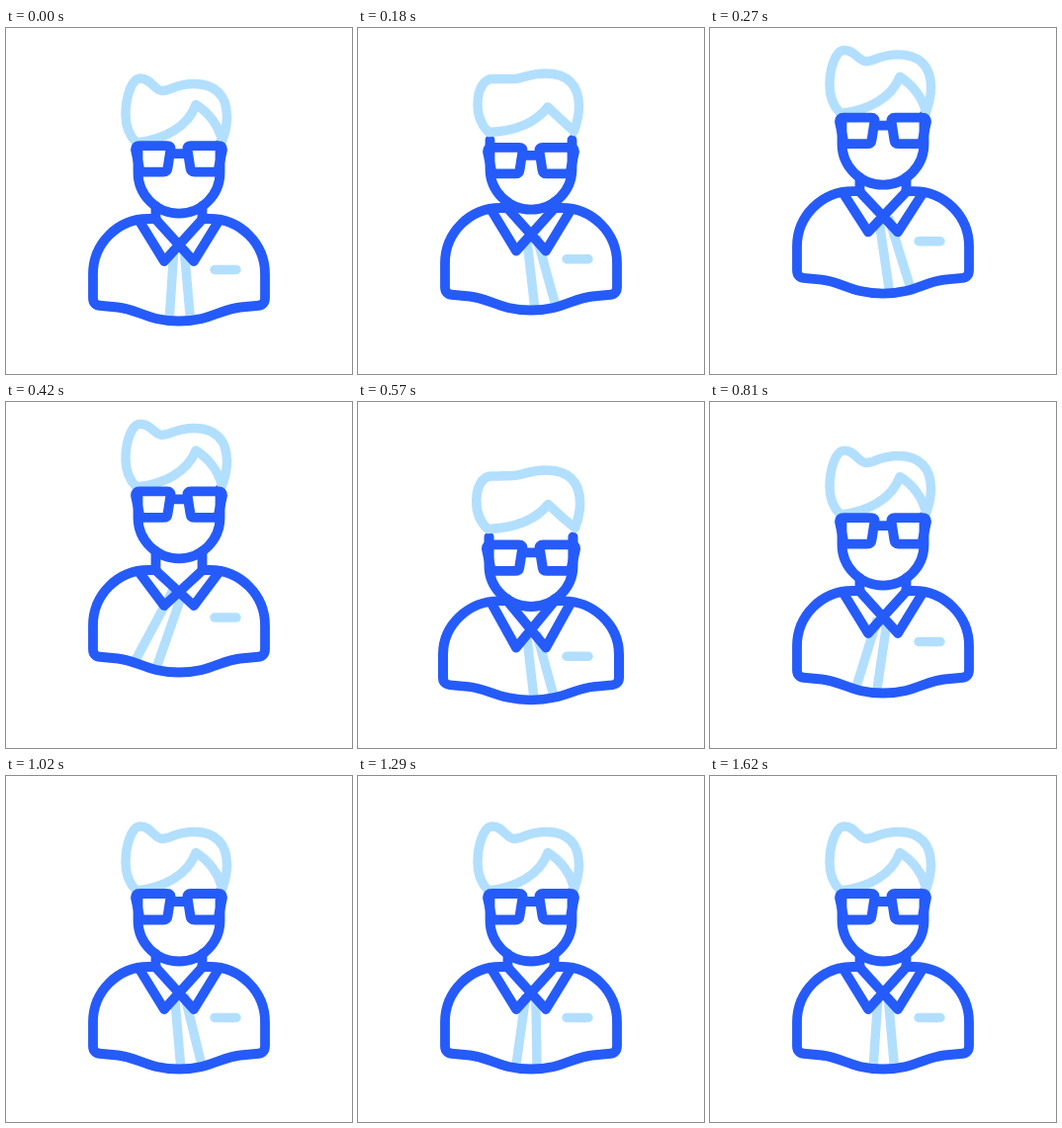
Animation of 350x350 px, one loop 1.79 s. Source, as an HTML page:

```html
<!DOCTYPE html>
<html lang="en">
<head>
<meta charset="utf-8">
<title>Jumping man icon</title>
<style>
  html, body { margin: 0; width: 100%; height: 100%; overflow: hidden; background: #fff; }
  svg { display: block; width: 100vw; height: 100vh; }
  path { fill: none; stroke: #255bfa; stroke-width: 9.8; stroke-linecap: round; stroke-linejoin: round; }
  .light { stroke: #b2dfff; stroke-width: 9.4; }
  #tie { stroke-linecap: butt; }
</style>
</head>
<body>
<svg viewBox="0 0 350 350">
  <clipPath id="inside"><use href="#body"/></clipPath>
  <g clip-path="url(#inside)"><path id="tie" class="light" d="M170 222L163 312M180 222L187 312"/></g>
  <path id="badge" class="light" d="M211 244.5H233"/>
  <path id="body" d="M198.5 193H206C237 193 262 218 262 249V273Q262 281 253 281L237 282.5
    C217 284.5 206 296.5 175 296.5C144 296.5 133 284.5 113 282.5L97 281
    Q88 281 88 273V249C88 218 113 193 144 193H151.5"/>
  <path id="neck"/>
  <path id="collar"/>
  <path id="face" d="M133.5 117V146A41.5 41.5 0 0 0 216.5 146V117"/>
  <path id="hair" class="light"/>
  <g id="glasses">
    <path id="lens" d="M131 123Q131 119 135 119H163Q167 119 166.5 122.5L163.5 142
      Q163 145.5 159 145.5H139Q135.5 145.5 135 142Z"/>
    <use href="#lens" transform="translate(350) scale(-1 1)"/>
    <path d="M167 127H183"/>
  </g>
</svg>
<script>
const LOOP = 1790, STEP = 30, LAST = 1620, MID = 175, FLOOR = 296.5, TALL = 103.5;

// Heights of the jump: time, body, upper parts
const JUMP = [
  [0, 0, 0], [100, 7, 8], [180, -11, -10.5], [310, -32, -35], [420, -23, -30],
  [570, 5, 12.5], [700, -4, -6], [810, -2, -2], [1000, 0, 0]
];

const $ = id => document.getElementById(id);
const draw = (id, d) => $(id).setAttribute('d', d);
const move = (id, v) => $(id).setAttribute('transform', v);
const bell = (t, at, width) => Math.exp(-(((t - at) / width) ** 2));

// Smooth curve through the key points
function jump(t, col) {
  const n = JUMP.length - 1;
  if (t >= JUMP[n][0]) return 0;
  const i = JUMP.findIndex(k => k[0] > t) - 1;
  const slope = j => j < 1 || j === n ? 0 :
    (JUMP[j + 1][col] - JUMP[j - 1][col]) / (JUMP[j + 1][0] - JUMP[j - 1][0]);
  const a = JUMP[i], b = JUMP[i + 1], span = b[0] - a[0], u = (t - a[0]) / span;
  return a[col] + (b[col] - a[col]) * u * u * (3 - 2 * u)
    + span * u * (1 - u) * (slope(i) * (1 - u) - slope(i + 1) * u);
}

// The tie swings like a fading pendulum
function swing(t) {
  const size = 27 * Math.min(1, t / 400) * Math.max(0, 1 - (t / 1400) ** 2);
  return size * Math.cos(2 * Math.PI * (t - 430) / 430) - .6;
}

function hairPath(k) {
  const bump = 51 + 11.5 * k, dip = 63.5 - 1.5 * k, peak = 77.5 + 13.5 * k;
  return `M132 116C124 108 121 98 121 88C121 ${70 + 3 * k} 127 ${bump} 136 ${bump}`
    + `C147 ${bump} 150 ${dip} 158 ${dip}C166 ${dip} 172 56.5 190 56.5`
    + `C212 56.5 223.5 68 223.5 90C223.5 100 221 108 218.5 115`
    + `C${216 - 6 * k} ${100 + 8 * k} ${206 - 5 * k} ${86 + 14 * k} 192 ${peak}`
    + `C${184 - 4 * k} ${100 + 6 * k} 160 ${113 + 2 * k} 132 116Z`;
}

function render(t) {
  const body = jump(t, 1), upper = jump(t, 2);
  const press = bell(t, 165, 70) + bell(t, 575, 105);
  const squash = Math.max(0, body), wide = 1 + squash / 220;
  const head = y => `translate(${MID} ${y}) scale(${wide} 1) translate(${-MID} 0)`;

  move('body', `translate(${MID} ${FLOOR + body}) `
    + `scale(${wide} ${1 - .65 * squash / TALL}) translate(${-MID} ${-FLOOR})`);
  move('tie', `translate(0 ${upper}) rotate(${swing(t)} ${MID} 219)`);
  move('badge', `translate(0 ${(body + upper) / 2 + squash * .8})`);

  const face = upper + 7 * press;
  move('face', head(face));
  move('hair', head(upper));
  move('glasses', head(upper + 13 * press));
  draw('hair', hairPath(press));

  const top = 193 + body + .65 * squash;
  draw('neck', [-23.5, 23.5].map(x => `M${MID + x} ${Math.min(180 + face, top)}V${top}`).join(''));
  draw('collar', [-1, 1].map(s =>
    `M${MID + s * 39} ${top + 4}L${MID + s * 15} ${236 + upper}L${MID - s * 24} ${top}`).join(''));
}

const start = performance.now();
function tick() {
  const t = (performance.now() - start) % LOOP;
  render(Math.min(LAST, Math.floor(t / STEP) * STEP));
  requestAnimationFrame(tick);
}
tick();
</script>
</body>
</html>
```
